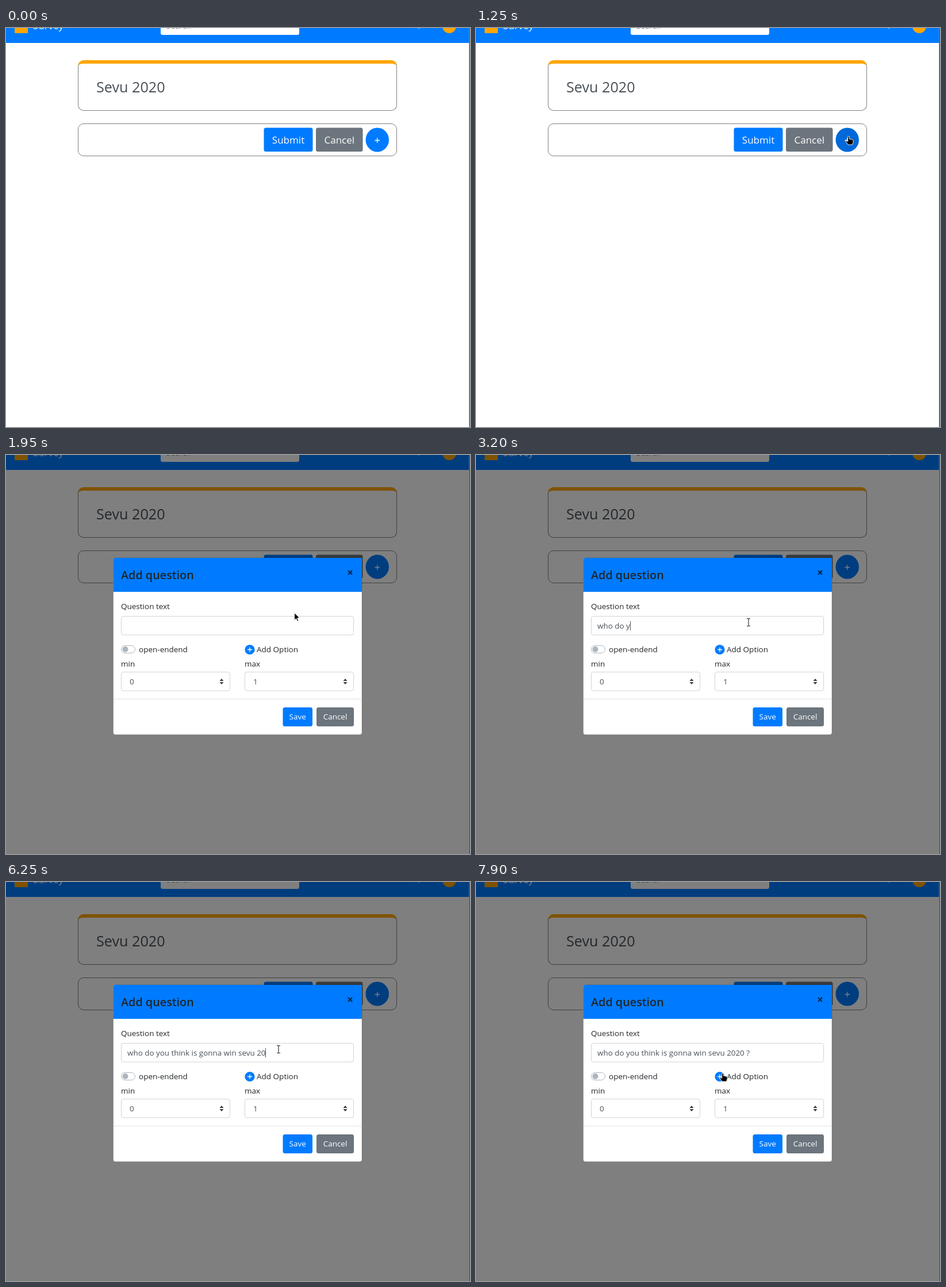
An HTML page for the animation above (8 s loop, 807 px wide and 694 px high).

```html
<!DOCTYPE html>
<html lang="en">
<head>
<meta charset="utf-8">
<title>Add question</title>
<style>
html, body { margin: 0; width: 100%; height: 100%; overflow: hidden; background: #fff; }
.card { position: absolute; left: 125px; width: 555px; box-sizing: border-box; border: 1px solid gray; border-radius: 10px; }
#head { top: 56px; height: 88px; border-top: 6px solid orange; }
#foot { top: 166px; height: 57px; }
svg { position: absolute; left: 0; top: 0; }
text { font: 13.5px 'Open Sans', sans-serif; fill: #212529; white-space: pre; }
.big { font-size: 17px; }
.heading { font-size: 25.2px; }
.title { font-size: 19.8px; font-weight: 600; }
.white { fill: #fff; }
.mid { text-anchor: middle; }
.value { fill: #495057; }
#typed { font-size: 13.4px; font-weight: 500; }
.blue { fill: #007bff; }
.gray { fill: #6c757d; }
.orange { fill: orange; }
.field { fill: #fff; stroke: #ced4da; }
.plus { stroke: #fff; stroke-width: 1.3; }
.tool { stroke: #fff; stroke-width: .9; stroke-linejoin: round; }
</style>
</head>
<body>
<div class="card" id="head"></div>
<div class="card" id="foot"></div>
<svg id="stage" width="807" height="694"></svg>
<script>
const LOOP = 8000, STEP = 50;
const $ = id => document.getElementById(id);
const show = (id, on) => $(id).style.display = on ? '' : 'none';

const box = (x, y, w, h, cls, r = 3.5, more = '') =>
  `<rect x="${x}" y="${y}" width="${w}" height="${h}" class="${cls}" rx="${r}" ${more}/>`;
const label = (x, y, str, cls = '', more = '') =>
  `<text x="${x}" y="${y}" class="${cls}" ${more}>${str}</text>`;
const button = (x, y, w, h, str, color, size = '') =>
  box(x, y, w, h, color) + label(x + w / 2, y + h / 2 + (size ? 6.5 : 4.8), str, 'white mid ' + size);
const plus = (x, y, r) => `<path class="plus" d="M${x - r} ${y}h${2 * r}M${x} ${y - r}v${2 * r}"/>`;
const select = (x, name, value) =>
  label(x - .5, 368, name) + box(x, 377.5, 189, 32.5, 'field') + label(x + 14.5, 398.5, value, 'value') +
  `<path d="M${x + 171} 393l3.5-4 3.5 4zm0 2l3.5 4 3.5-4z" fill="#343a40"/>`;
const bar = 'M-3-6.5h2l1 1 1-1h2M0-5.5v11M-3 6.5h2l1-1 1 1h2';

const page = [
  box(0, 0, 805.5, 26, 'blue', 0),
  box(15, -14, 23, 23, 'orange', 0),
  label(47, 2, 'Survey', 'big white'),
  box(269, -21, 241, 33, 'white'),
  label(279, 1, 'Search', 'gray'),
  '<path d="M715-2a3 3 0 0 0 6 0" fill="#fff" opacity=".6"/>',
  '<circle cx="771" cy="-3" r="12" class="orange"/>',
  label(157, 112, 'Sevu 2020', 'heading value'),
  button(448.5, 173.5, 85, 41.5, 'Submit', 'blue', 'big'),
  button(539, 173.5, 81.5, 41.5, 'Cancel', 'gray', 'big'),
  box(625.5, 173.5, 40.5, 42, '', 21, 'id="add"'),
  plus(645.75, 195.5, 4.3)
].join('');

const dialog = [
  box(186.5, 179, 432.5, 307.5, 'white', 4, 'stroke="#000" stroke-opacity=".2"'),
  '<path class="blue" d="M186.5 238v-55q0-4 4-4h424.500q4 0 4 4v55z"/>',
  label(200, 215.5, 'Add question', 'title'),
  '<path d="M595 201l7 7m0-7l-7 7" stroke="#00264f" stroke-width="2.200"/>',
  label(200, 268, 'Question text'),
  box(200.5, 280.5, 404, 32.5, 'field'),
  label(211, 301.5, '', 'value', 'id="typed"'),
  '<rect id="caret" y="289" width="1" height="16" class="value"/>',
  box(200.5, 331.5, 24, 13, '', 6.5, 'fill="#fff" stroke="#adb5bd"'),
  '<circle cx="207.500" cy="338" r="5" fill="#adb5bd"/>',
  label(231, 343, 'open-endend'),
  '<circle class="blue" cx="424" cy="338.500" r="8.600"/>',
  plus(424, 338.5, 4),
  label(436, 343, 'Add Option'),
  select(200.5, 'min', 0),
  select(415.5, 'max', 1),
  '<path d="M187 424.500h431.500" stroke="#dee2e6"/>',
  button(481.5, 439, 51.5, 33, 'Save', 'blue'),
  button(540, 439, 65, 33, 'Cancel', 'gray')
].join('');

$('stage').innerHTML = `${page}
  <rect id="edge" x="805.5" width="1.5" height="694"/>
  <g id="modal"><rect width="805.5" height="694" opacity=".5"/><g id="dialog">${dialog}</g></g>
  <g id="pointer">
    <path id="arrow" class="tool" d="M0 0v12.500l3-2.600 2 4.600 2-.9-2-4.500 4-.3z"/>
    <g id="beam" fill="none">
      <path d="${bar}" stroke="#fff" stroke-width="2.600" opacity=".7"/>
      <path d="${bar}" stroke="#333" stroke-width="1.200"/>
    </g>
    <path id="hand" class="tool" d="M-1.300 0q1.300-1.400 2.600 0v4l5.200 1q1.500.5 1.500 2v3l-1.400 4h-7.600l-3.500-5.200q-.6-1.700 1-1.800l2.200 1.500z"/>
  </g>`;

// Each burst of typing: start, end, characters
const bursts = [
  [2500, 3500, 'who do you '],
  [3650, 4050, 'think'],
  [4450, 4600, ' i'],
  [5000, 5000, 's go'],
  [5150, 6000, 'nna win sev'],
  [6100, 6500, 'u 2020 ?']
];

// Each pointer move: start, end, control point, end point
const moves = [
  [150, 1150, [720, 220], [648, 189]],
  [1450, 1450, [566, 231], [566, 231]],
  [1600, 2150, [520, 265], [474, 291]],
  [7150, 7900, [262, 345], [429, 333]]
];

const progress = (t, a, b) => t >= b ? 1 : Math.max(0, (t - a) / (b - a));

const typedAt = t => bursts.map(([a, b, str]) =>
  t < a ? '' : str.slice(0, Math.round(1 + (str.length - 1) * progress(t, a, b)))).join('');

function pointerAt(t) {
  let at = [806, 262];
  for (const [a, b, via, to] of moves) {
    const p = progress(t, a, b), k = p * p * (3 - 2 * p);
    at = at.map((v, i) => v * (1 - k) ** 2 + 2 * k * (1 - k) * via[i] + k * k * to[i]);
  }
  return at;
}

const start = performance.now();
function draw() {
  const t = Math.floor((performance.now() - start) % LOOP / STEP) * STEP;
  const open = t >= 1450;
  const settled = t >= 1600;
  const [x, y] = pointerAt(t);
  const over = (left, top, right, bottom) => x >= left && x <= right && y >= top && y <= bottom;

  const onAdd = !open && over(626, 174, 666, 215);
  const onOption = open && over(415, 330, 433, 347);
  const onInput = open && over(200, 280, 605, 313);
  const shape = onAdd || onOption ? 'hand' : onInput ? 'beam' : 'arrow';
  for (const id of ['hand', 'beam', 'arrow']) show(id, id === shape);
  show('pointer', t >= 150);
  $('pointer').setAttribute('transform', `translate(${x} ${y})`);

  $('add').setAttribute('fill', onAdd ? '#0069d9' : '#007bff');
  $('edge').setAttribute('fill', t < 150 ? '#555' : '#1d5676');
  show('modal', open);
  $('dialog').setAttribute('transform', settled ? '' : 'translate(.4 -12)');

  const str = typedAt(t);
  $('typed').textContent = str;
  show('caret', t >= 2150 && t < 6950);
  $('caret').setAttribute('x', Math.round(211 + (str && $('typed').getComputedTextLength())));
  requestAnimationFrame(draw);
}
draw();
</script>
</body>
</html>
```
